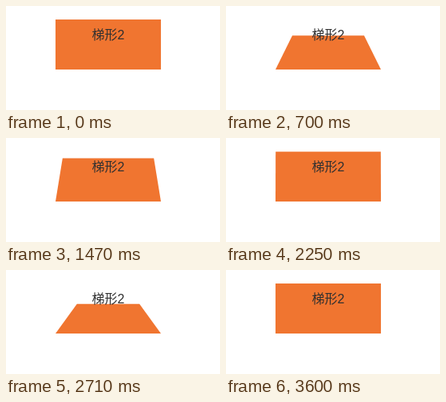
Recreate the animation shown at these times as an HTML page with a canvas. Size 268 px wide and 131 px high, loop 4.45 s.

```html
<!DOCTYPE html>
<html lang="zh-CN">
<head>
<meta charset="utf-8">
<title>梯形2</title>
<style>
  html, body { margin: 0; width: 100%; height: 100%; overflow: hidden; background: #fff; }
  canvas { display: block; width: 268px; height: 131px; }
</style>
</head>
<body>
<canvas id="stage"></canvas>
<script>
const W = 268, H = 131, LOOP = 4450;
const box = { cx: 128, bottom: 80, w: 132, h: 63 };
const DEPTH = 8, ANGLE = 5 * Math.PI / 180, DURATION = 500;

// begin: transition start; first/last/steps: when the picture updates
const moves = [
  { begin: 438, first: 520, last: 940, steps: 7, to: 1 },
  { begin: 1317, first: 1350, last: 1710, steps: 6, to: 0 },
  { begin: 2212, first: 2250, last: 2710, steps: 8, to: 1 },
  { begin: 3165, first: 3190, last: 3600, steps: 7, to: 0 }
];

const canvas = document.getElementById('stage');
const ctx = canvas.getContext('2d');
const ratio = window.devicePixelRatio || 1;
canvas.width = Math.round(W * ratio);
canvas.height = Math.round(H * ratio);
ctx.scale(ratio, ratio);

const bezier = (a, b, u) => 3 * a * u * (1 - u) ** 2 + 3 * b * u * u * (1 - u) + u ** 3;

// CSS "ease": cubic-bezier(.25, .1, .25, 1)
function ease(x) {
  if (x <= 0) return 0;
  if (x >= 1) return 1;
  let lo = 0, hi = 1;
  for (let i = 0; i < 24; i++) {
    const mid = (lo + hi) / 2;
    if (bezier(0.25, 0.25, mid) < x) lo = mid; else hi = mid;
  }
  return bezier(0.1, 1, lo);
}

function tiltAt(time) {
  let tilt = 0;
  for (const m of moves) {
    if (time < m.first) break;
    if (time >= m.last) { tilt = m.to; continue; }
    const step = (m.last - m.first) / m.steps;
    const shown = m.first + Math.floor((time - m.first) / step) * step;
    const p = ease((shown - m.begin) / DURATION);
    tilt = m.to ? p : 1 - p;
  }
  return tilt;
}

// perspective() and rotateX() grow together, hinged on the bottom edge
function drawBox(tilt) {
  const { cx, bottom, w, h } = box;
  const a = ANGLE * tilt;
  const scale = 1 / (1 + h * Math.sin(a) * tilt / DEPTH);
  const top = bottom - h * Math.cos(a) * scale;
  const half = w / 2;
  ctx.fillStyle = '#f07530';
  ctx.beginPath();
  ctx.moveTo(cx - half, bottom);
  ctx.lineTo(cx - half * scale, top);
  ctx.lineTo(cx + half * scale, top);
  ctx.lineTo(cx + half, bottom);
  ctx.fill();
}

function drawLabel() {
  ctx.font = '16px "Liberation Sans", "Noto Sans CJK SC", "Noto Sans CJK", sans-serif';
  ctx.textAlign = 'center';
  ctx.fillStyle = '#303030';
  ctx.fillText('梯形2', box.cx, 42);
}

function frame() {
  ctx.fillStyle = '#fff';
  ctx.fillRect(0, 0, W, H);
  drawBox(tiltAt(performance.now() % LOOP));
  drawLabel();
  requestAnimationFrame(frame);
}
frame();
</script>
</body>
</html>
```
